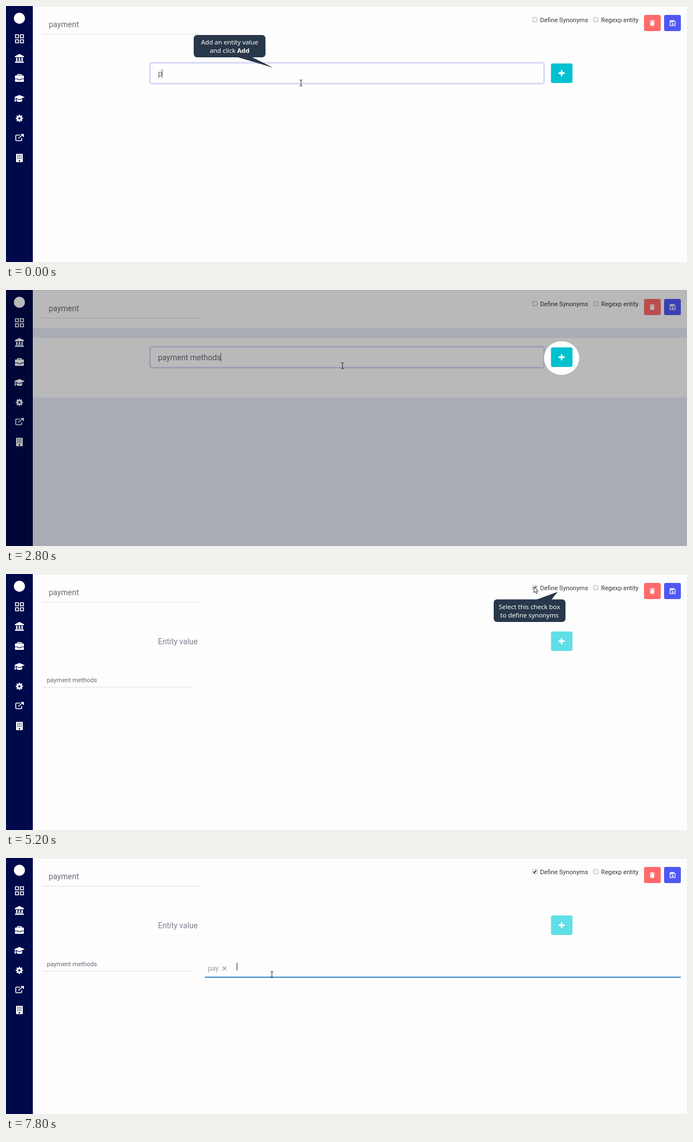
Recreate the animation shown at these times as an HTML page. Size 1219 px wide and 459 px high, loop 8 s.

```html
<!DOCTYPE html>
<html lang="en">
<head>
<meta charset="utf-8">
<title>Entity editor</title>
<style>
  html, body { margin: 0; width: 100%; height: 100%; overflow: hidden; background: #fdfdfd; }
  svg { display: block; width: 100%; height: 100%; }
  text { font-family: Roboto, sans-serif; fill: #666c77; white-space: pre; }
  .big { font-size: 14px; }
  .small { font-size: 11.2px; }
  .label { font-size: 11.2px; fill: #30353d; }
  .callout { fill: #28374a; }
  .callout text { font: 11.35px "Noto Sans", sans-serif; fill: #fff; text-anchor: middle; }
  .line { stroke: #dcdde0; }
  .box { fill: #f6f6f6; stroke: #b4b4b4; }
  .icons { fill: #fff; }
  .outline { fill: none; stroke: #fff; stroke-width: 1.6; }
  .cut { fill: #00094a; }
</style>
</head>
<body>
<svg viewBox="0 0 1219 459">
  <rect width="1219" height="459" fill="#fdfdfd"/>
  <g id="pageBands" fill="#e9ecf6">
    <path d="M48 68H1219V86H48ZM48 193H1219V459H48Z"/>
  </g>
  <path d="M48 .5H1219" stroke="#e6eaec"/>

  <!-- Sidebar -->
  <rect width="48" height="459" fill="#00094a"/>
  <g class="icons">
    <circle cx="24" cy="22" r="10"/>
    <path class="outline" d="M17 51.5h5.5v5.5H17zM25.800 51.500h5.500v5.500h-5.500zM17 60.500h5.500v5.500H17zM25.800 60.500h5.500v5.500h-5.500z"/>
    <path d="M24 86l8 4v2H16v-2zM18 93h2.500v5H18zM22.700 93h2.600v5h-2.600zM27.500 93H30v5h-2.500zM17 98.500h14v1.200H17zM16 100.300h16v1.700H16z"/>
    <rect x="16" y="124.500" width="16" height="11.500" rx="1.500"/>
    <path class="outline" d="M21 125v-2.200h6v2.200"/>
    <path class="cut" d="M16 130.300h6v1.500h4v-1.500h6v.9h-5v1.600h-6v-1.600h-5z"/>
    <path d="M14.500 163.500L24 159.500l9.500 4-9.500 4zM19 166.600l5 2.100 5-2.100v4.200q-5 2.400-10 0zM16 164.500h1.200l.6 7h-2.600z"/>
    <circle cx="24" cy="201.500" r="5"/>
    <circle class="outline" cx="24" cy="201.500" r="5.400" style="stroke-width:2.200" pathLength="16" stroke-dasharray="1" stroke-dashoffset=".5"/>
    <circle class="cut" cx="24" cy="201.500" r="2.100"/>
    <path class="outline" d="M25 231.500H18.500q-1 0-1 1v8q0 1 1 1H27q1 0 1-1V237M22 237.500l7.500-6.500"/>
    <path d="M26 229.500h6v6z"/>
    <rect x="18" y="265" width="12" height="15" rx=".8"/>
    <path class="cut" d="M20.200 267.500h7.600M20.200 270.500h7.600M20.200 273.500h7.600" stroke="#00094a" stroke-width="1.300" stroke-dasharray="1.600 1.400"/>
    <path class="cut" d="M22.800 276.500h2.400v2.500h-2.400z"/>
  </g>

  <!-- Header -->
  <text class="big" x="76.500" y="38.300">payment</text>
  <path class="line" d="M65 50.500H349"/>
  <rect class="box" x="942.500" y="20.500" width="8" height="8" rx="1"/>
  <path id="tick" d="M944.300 24.500l1.700 2 3-4.200" fill="none" stroke="#222" stroke-width="1.500"/>
  <rect class="box" x="1051.500" y="20.500" width="8" height="8" rx="1"/>
  <text class="label" x="956" y="28.800">Define Synonyms</text>
  <text class="label" x="1065.300" y="28.800">Regexp entity</text>
  <rect x="1142" y="16" width="30" height="29" rx="3" fill="#ff6b6b"/>
  <path d="M1152.300 26.800h9v1.300h-9zM1155 25.500h3.600v1.300H1155zM1153 28.800h7.600l-.5 6.700h-6.600z" fill="#fff"/>
  <rect x="1178" y="16" width="30" height="29" rx="3" fill="#4f58f5"/>
  <path d="M1188.700 26.200h7l2 2v7h-9z" fill="none" stroke="#fff" stroke-width="1.300"/>
  <path d="M1190 26h5v3.200h-5z" fill="#fff"/>
  <circle cx="1193.200" cy="32.300" r="1.500" fill="#fff"/>

  <!-- Value field -->
  <rect id="glow" x="257.500" y="101.500" width="706" height="38" rx="4" fill="none" stroke="#e2e2fc" stroke-width="3"/>
  <rect id="field" x="258.500" y="102.500" width="704" height="36" rx="3" fill="#fefefe"/>
  <text id="value" class="big" x="272" y="125.700"></text>
  <path id="valueCaret" d="M0 113V129" stroke="#555a66"/>

  <!-- Value row -->
  <g id="row">
    <text class="small" x="73" y="193.700">payment methods</text>
    <path class="line" d="M65 203H331" stroke-width="1.200"/>
  </g>
  <path id="focusLine" d="M356 213.700H1208" stroke="#2f86c5" stroke-width="2"/>
  <text id="synonym" x="361.500" font-size="12"></text>
  <path id="chipCross" d="M387.500 194.500l7 7m0-7l-7 7" stroke="#92979d" stroke-width="1.100"/>
  <path id="synonymCaret" d="M0 188V201.500" stroke="#222"/>

  <g id="tipAdd" class="callout">
    <rect x="336" y="52" width="128.500" height="40" rx="6"/>
    <path d="M412 91H439L478 110.500Z"/>
    <text x="400.300" y="68.700">Add an entity value</text>
    <text x="400.300" y="83.800">and click <tspan font-weight="700">Add</tspan></text>
  </g>
  <g id="tipCheck" class="callout">
    <rect x="873" y="45.500" width="128.500" height="40.500" rx="6"/>
    <path d="M948 46.500H976L987.500 32Z"/>
    <text x="937" y="62.500">Select this check box</text>
    <text x="937" y="77.800">to define synonyms</text>
  </g>

  <!-- Spotlight -->
  <g id="spotlight">
    <path d="M0 0H1219V459H0ZM963 122a31.500 30 0 0 0 63 0a31.500 30 0 0 0-63 0" fill-rule="evenodd" opacity=".27"/>
    <ellipse cx="994.500" cy="122" rx="31.500" ry="30" fill="#fefefe"/>
  </g>
  <rect id="addButton" x="975.500" y="103" width="38.500" height="35" rx="3"/>
  <path d="M994.500 115v11M989 120.500h11" stroke="#fff" stroke-width="2.800"/>

  <g id="pointer" stroke="#222" stroke-width="1">
    <path id="ibeam" fill="none" d="M-2.500-5.500Q0-5.500 0-4Q0-5.500 2.500-5.500M0-4V4M-2.500 5.500Q0 5.500 0 4Q0 5.500 2.500 5.500"/>
    <path id="arrow" fill="#fff" stroke-width=".9" d="M0 0V10.500L2.400 8.300 4.200 12.200 5.900 11.400 4.200 7.700H7.400Z"/>
    <path id="hand" fill="#fff" d="M-1 7V1Q0-.8 1 1V5Q2.500 4 3 5.500Q4.500 4.700 5 6Q6.700 5.500 6.800 7.500V10L5.500 14H0L-3.500 9Q-3.200 6.500-1 8.500Z"/>
  </g>
</svg>
<script>
const LOOP = 8000, STEP = 200;
const $ = id => document.getElementById(id);
const show = (id, on) => $(id).style.display = on ? "" : "none";
const during = (t, from, to = LOOP) => t >= from && t < to;

// Each stroke: [time, number of characters typed by then]
const valueTyping = [[0, 1], [200, 2], [400, 3], [800, 4], [1000, 6], [1200, 8], [1400, 10], [1800, 12], [2000, 13], [2200, 15]];
const synonymTyping = [[0, 0], [7000, 1], [7200, 2], [7400, 3]];
const typed = (text, strokes, t) => text.slice(0, strokes.findLast(([at]) => at <= t)[1]);

// Pointer moves: [start, end, x, y]
const startPoint = [528, 138];
const moves = [[2600, 3400, 1003, 124], [4000, 4800, 945, 23], [5200, 6200, 475, 209]];
const ease = p => p * p * (3 - 2 * p);

function pointerAt(t) {
  let [x, y] = startPoint;
  for (const [from, to, toX, toY] of moves) {
    const p = ease(Math.min(1, Math.max(0, (t - from) / (to - from))));
    x += (toX - x) * p;
    y += (toY - y) * p;
  }
  return [x, y];
}

function placeCaret(id, textId, on) {
  show(id, on);
  const text = $(textId);
  const x = Math.floor(+text.getAttribute("x") + text.getComputedTextLength()) + .5;
  $(id).setAttribute("transform", `translate(${x})`);
}

function render(now) {
  const t = Math.floor(now % LOOP / STEP) * STEP;
  const added = t >= 4000, focused = t < 3800, chip = t >= 7800;
  const spotlit = during(t, 1800, 3800);

  show("pageBands", spotlit);
  show("spotlight", spotlit);
  show("tipAdd", t < 2000);
  show("tipCheck", during(t, 4600, 6600));
  show("tick", t >= 5200);
  show("row", added);
  show("focusLine", t >= 6400);
  show("glow", focused);

  $("field").setAttribute("stroke", added ? "#f9f9fa" : focused ? "#c7c8ee" : "#dadaf6");
  $("value").textContent = added ? "Entity value" : typed("payment methods", valueTyping, t);
  $("value").style.fill = added ? "#7b828d" : "";
  placeCaret("valueCaret", "value", focused);

  $("synonym").textContent = typed("pay", synonymTyping, t);
  $("synonym").setAttribute("y", chip ? 202 : 199);
  $("synonym").style.fill = chip ? "#979ca3" : "#555b66";
  show("chipCross", chip);
  placeCaret("synonymCaret", "synonym", t >= 6400);
  if (chip) $("synonymCaret").setAttribute("transform", "translate(413.5)");

  const [x, y] = pointerAt(t);
  const overButton = x > 975 && y > 103;
  const overText = (t < 3800 && x < 964) || t >= 6400;
  $("addButton").setAttribute("fill",
    added ? "#60dfe6" : t >= 3800 ? "#0098a5" : overButton ? "#00a9b7" : "#00c1d0");
  show("hand", overButton);
  show("ibeam", overText);
  show("arrow", !overButton && !overText);
  $("pointer").setAttribute("transform", `translate(${x + (t >= 6400 ? 1 : 0)} ${y})`);
}

function frame() {
  render(performance.now());
  requestAnimationFrame(frame);
}
frame();
</script>
</body>
</html>
```
